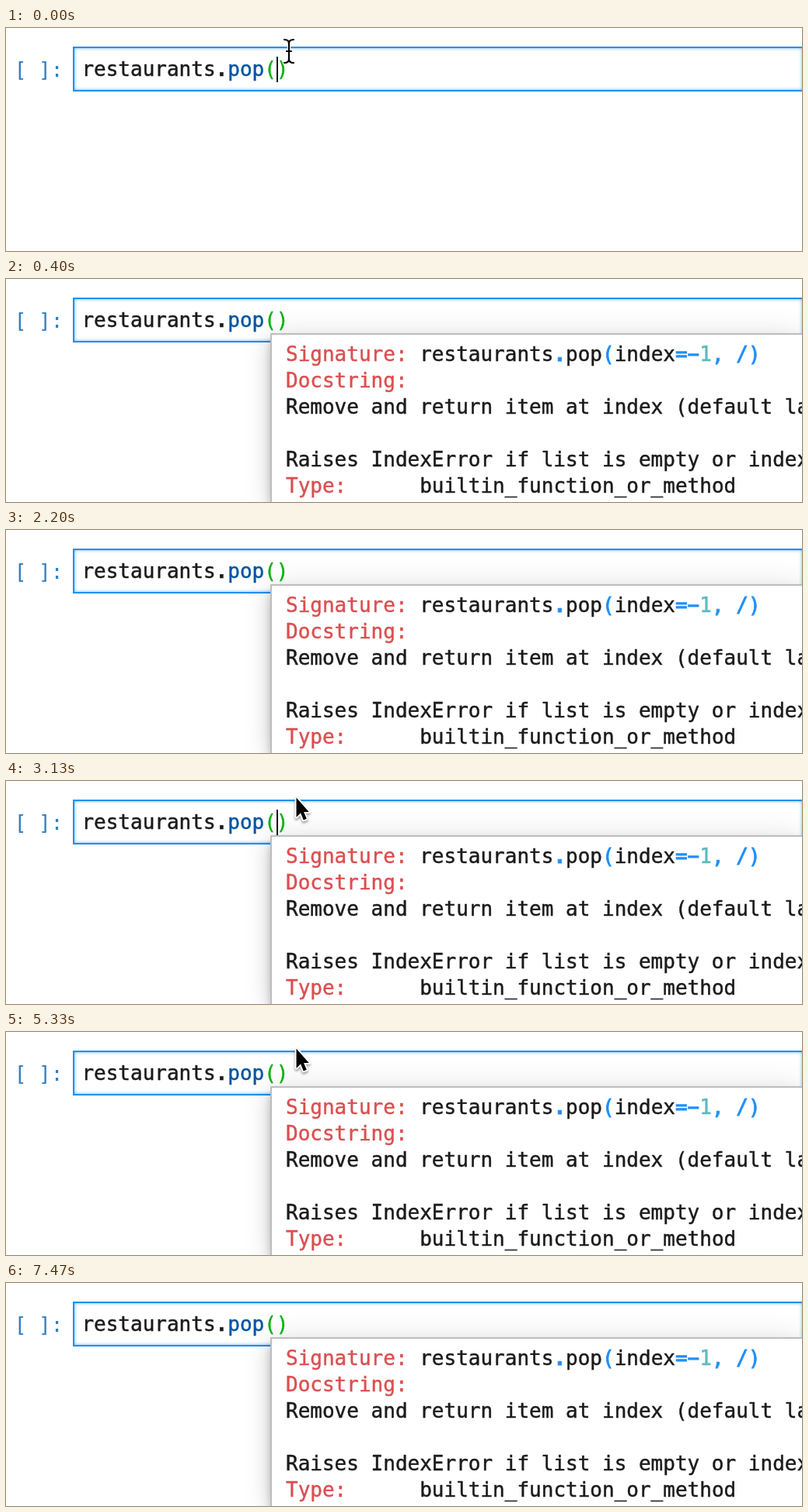
An HTML page that plays this animation: 1024x288 px, repeating every 7590 ms.

```html
<!DOCTYPE html>
<html lang="en">
<head>
<meta charset="utf-8">
<title>Tooltip for list.pop</title>
<style>
  html, body { margin: 0; width: 100%; height: 100%; overflow: hidden; background: #fff; }
  div, svg { position: absolute; box-sizing: border-box; }
  svg { left: 0; top: 0; width: 100%; height: 100%; overflow: hidden; }
  text {
    font: 26px "DejaVu Sans Mono", monospace; white-space: pre;
    fill: #1b1b1b; stroke: #1b1b1b; stroke-width: .45px;
  }
  #cell {
    left: 86px; top: 24px; right: 0; height: 58px;
    border: 2px solid #2190ee; border-right: 0; box-shadow: inset 0 0 4px #64b5f6;
  }
  #tip {
    left: 340px; top: 70px; right: 0; bottom: 0;
    background: #fff; border: solid #bdbdbd; border-width: 2px 0 0 2px;
    box-shadow: 0 6px 10px -2px #0003, 0 12px 20px #00000024, 0 2px 36px #0000001f;
  }
  .prompt { fill: #307fc1; stroke: none; }
  .prop { fill: #0055a0; stroke: #0055a0; }
  .bracket { fill: #0ab10f; stroke: #0ab10f; }
  .red { fill: #db4f50; stroke: #db4f50; }
  .blue { fill: #208ffb; stroke: #208ffb; stroke-width: .9px; }
  .cyan { fill: #5abbc0; stroke: #5abbc0; }
  .dot { font-weight: bold; }
  #beam { fill: none; stroke: #000; stroke-width: 2.2; stroke-linecap: round; }
  #beam .halo { stroke: #fff; stroke-width: 4.5; }
  #arrow path { stroke: #fff; stroke-width: 3.6; stroke-linejoin: round; paint-order: stroke; }
  #arrow { filter: drop-shadow(0 2px 1.5px #0006); }
</style>
</head>
<body>
<div id="cell"></div>
<div id="tip"></div>
<svg>
  <defs>
    <path id="ibeam" d="M358 15Q364 15 364 20Q364 15 370 15M364 20V40M358 45Q364 45 364 40Q364 45 370 45M361 30H367"/>
  </defs>
  <text class="prompt" x="10.8" y="63">[ ]:</text>
  <text x="97.4" y="62">restaurants<tspan class="dot">.</tspan><tspan class="prop">pop</tspan><tspan class="bracket">()</tspan></text>
  <g id="doc">
    <text x="360" y="106"><tspan class="red">Signature:</tspan> restaurants<tspan class="blue dot">.</tspan>pop<tspan class="blue">(</tspan>index<tspan class="blue">=−</tspan><tspan class="cyan">1</tspan><tspan class="blue">, /)</tspan></text>
    <text x="360" y="140" class="red">Docstring:</text>
    <text x="360" y="174">Remove and return item at index (default last</text>
    <text x="360" y="242">Raises IndexError if list is empty or index</text>
    <text x="360" y="276"><tspan class="red">Type:</tspan>      builtin_function_or_method</text>
  </g>
  <rect id="caret" x="348" y="37" width="2" height="33" fill="#111"/>
  <g id="beam">
    <use href="#ibeam" class="halo"/>
    <use href="#ibeam"/>
  </g>
  <g id="arrow"><path d="M0 0V24L5.3 18.9L8.8 27.5L12.6 26L9.1 17.5H15.5Z"/></g>
</svg>
<script>
  const LOOP = 7590, TICK = 200 / 3;
  const get = id => document.getElementById(id);
  const tip = get('tip'), doc = get('doc'), caret = get('caret'), beam = get('beam'), arrow = get('arrow');
  // Times at which the caret flips, starting visible
  const flips = [70, 600, 1130, 1670, 2200, 2670, 3200, 3730, 4270, 4800, 5330, 5870, 6400, 6930, 7470];
  const show = (el, on) => { el.style.visibility = on ? 'visible' : 'hidden'; };

  function draw(now) {
    const t = now % LOOP;
    show(tip, t >= 400);
    show(doc, t >= 400);
    show(caret, flips.filter(f => f <= t).length % 2 === 0);
    show(beam, t < 200);
    show(arrow, t >= 2600 && t < 6200);
    // The pointer speeds up and leaves over the top edge
    const step = Math.floor(t / TICK) * TICK;
    const d = 29.5 * Math.max(0, (step - 5900) / 167) ** 2;
    arrow.setAttribute('transform', `translate(${373.5 + 1.03 * d} ${21.5 - d}) scale(1.05)`);
    requestAnimationFrame(draw);
  }
  draw(0);
</script>
</body>
</html>
```
